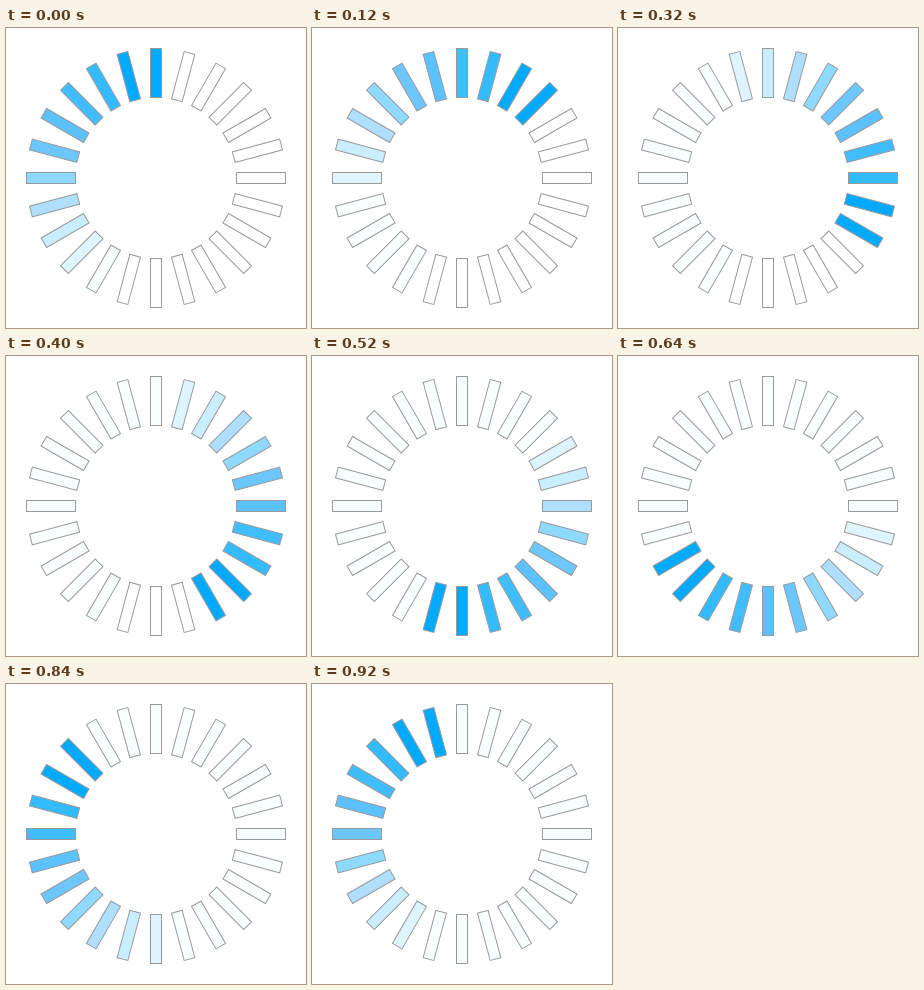
These frames come from a looping animation (300x300 px, 960 ms). An HTML page:

```html
<!DOCTYPE html>
<html lang="en">
<head>
<meta charset="utf-8">
<title>Spinner</title>
<style>
  html, body { margin: 0; width: 100%; height: 100%; overflow: hidden; background: #fff; }
  svg { display: block; width: 300px; height: 300px; }
  rect { stroke: #999; stroke-width: 1; }
</style>
</head>
<body>
<svg id="stage" viewBox="0 0 300 300"></svg>
<script>
  const COUNT = 24, STEP = 40;
  const FIRST_TINTED = 14; // bars before this stay white until the head reaches them
  const TRAIL = ['#00aaff', '#00aaff', '#33bbff', '#40bdff', '#5bc2ff', '#6cc7ff',
                 '#8edaff', '#aedfff', '#c8eeff', '#def4ff', '#f8fffe'];
  const stage = document.getElementById('stage');

  function makeBar(i) {
    const bar = document.createElementNS(stage.namespaceURI, 'rect');
    const attrs = { x: 144.5, y: 20.5, width: 11, height: 49,
                    transform: `rotate(${i * 360 / COUNT} 150 150)` };
    for (const key in attrs) bar.setAttribute(key, attrs[key]);
    return stage.appendChild(bar);
  }

  const bars = Array.from({ length: COUNT }, (_, i) => makeBar(i));

  function colorOf(i, head) {
    if (i > head && i < FIRST_TINTED) return '#fff';
    const age = (head - i + COUNT) % COUNT;
    return TRAIL[Math.min(age, TRAIL.length - 1)];
  }

  function draw() {
    const head = Math.floor(performance.now() / STEP) % COUNT;
    bars.forEach((bar, i) => bar.setAttribute('fill', colorOf(i, head)));
    requestAnimationFrame(draw);
  }
  draw();
</script>
</body>
</html>
```
